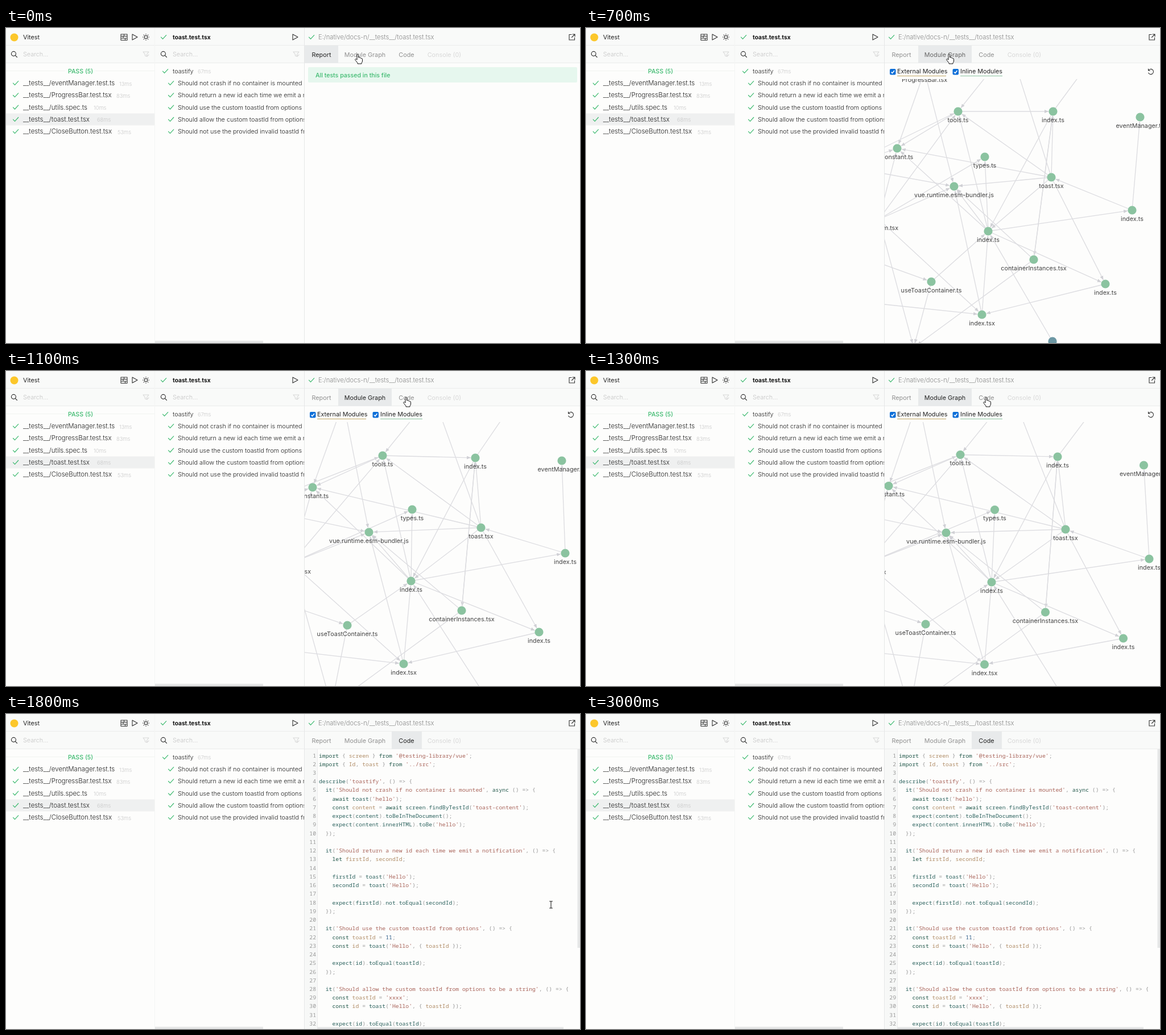
Write an HTML page that moves like this. It is 1009 by 555 pixels and loops after 3100 ms.

```html
<!DOCTYPE html>
<html lang="en">
<head>
<meta charset="utf-8">
<title>Test report</title>
<style>
html, body { margin: 0; width: 100%; height: 100%; overflow: hidden; background: #fdfdfc; }
svg { display: block; width: 1009px; height: 555px; }
text { font: 300 10.8px Inter, "Open Sans", sans-serif; fill: #222; white-space: pre; }
.bar { fill: #f9faf9; }
.rule { stroke: #ebecec; fill: none; }
.icon { stroke: #333; stroke-width: 1.1; fill: none; stroke-linecap: round; stroke-linejoin: round; }
.faint { stroke: #d8d8d8; }
.tick { stroke: #3dba6f; stroke-width: 1.2; }
.hint { fill: #c4c4c4; }
.file { font-size: 11.5px; }
.ms { font-size: 9.3px; fill: #c8c8c8; }
.title { font-weight: 700; font-size: 10.2px; fill: #111; }
.path { font-size: 11.2px; fill: #888; }
.pass { font-weight: 500; font-size: 10.6px; fill: #3dba6f; }
.tab { text-anchor: middle; font-weight: 400; fill: #909090; }
.off { fill: #d8d8d8; }
.thumb { fill: #e6e7e7; }
.opt { font-weight: 400; }
.node text { font-weight: 400; fill: #444; text-anchor: middle; }
.edge { stroke: #dcdce0; stroke-width: 1.3; }
#code text { font: 400 9.77px "Noto Sans Mono", "DejaVu Sans Mono", monospace; fill: #999; }
#code .num { text-anchor: end; }
.str { fill: #a9645a; }
.key { fill: #21574a; }
.def { fill: #b08c66; }
.id { fill: #2c625e; }
.lit { fill: #2f5f8a; }
</style>
</head>
<body>
<svg viewBox="0 0 1009 555">
  <defs>
    <marker id="arrow" viewBox="0 0 7 6" refX="7" refY="3" markerWidth="7" markerHeight="6" markerUnits="userSpaceOnUse" orient="auto">
      <path d="M0 0L7 3L0 6Z" fill="#d0d0d5"/>
    </marker>
    <clipPath id="cases"><rect x="262" y="62" width="262" height="493"/></clipPath>
    <clipPath id="stage"><rect x="525" y="90" width="484" height="465"/></clipPath>
    <path id="tick" class="icon tick" d="M-4.500 .2L-1.500 3.400L4.700 -3.400"/>
    <path id="play" class="icon" d="M-4 -5L5 0L-4 5Z"/>
    <path id="lens" class="icon" d="M2.600 2.600L5.500 5.500M3.400 -.6a4 4 0 1 1 -8 0a4 4 0 1 1 8 0"/>
    <path id="funnel" class="icon faint" d="M-5 -4H5L1.500 .5V4L-1.500 3V.5ZM2 4L5 1"/>
  </defs>

  <rect class="bar" width="1009" height="62"/>
  <path class="rule" d="M0 30.500H1009M0 61.500H1009"/>

  <!-- file list -->
  <circle cx="14.500" cy="16.500" r="7" fill="#fcc72b"/>
  <text x="30" y="20" style="font-weight:400">Vitest</text>
  <path class="icon" d="M202 11H213V21.500H202ZM202 14.500H213M202 18H213M207.500 11V14.500M206 14.500V18M209.500 18V21.500"/>
  <use href="#play" x="226" y="16"/>
  <g class="icon" transform="translate(246 16)">
    <circle r="2.700"/>
    <path d="M0 -5.500V-4.700M0 4.700V5.500M-5.500 0H-4.700M4.700 0H5.500M-3.900 -3.900L-3.400 -3.400M3.400 3.400L3.900 3.900M-3.900 3.900L-3.400 3.400M3.400 -3.400L3.900 -3.900"/>
  </g>
  <use href="#lens" x="14" y="46"/>
  <text class="hint" x="30" y="50">Search...</text>
  <use href="#funnel" x="246" y="46"/>
  <path class="rule" style="stroke:#f1f4f0" d="M0 75.500H104M157 75.500H262"/>
  <text class="pass" x="131" y="79.500" text-anchor="middle">PASS (5)</text>
  <rect y="150.500" width="262" height="21" fill="#eff0f0"/>
  <g id="files"></g>

  <!-- test cases -->
  <use href="#tick" x="277" y="16"/>
  <text class="title" x="293" y="20">toast.test.tsx</text>
  <use href="#play" x="508" y="16"/>
  <use href="#lens" x="277" y="46"/>
  <text class="hint" x="293" y="50">Search...</text>
  <use href="#funnel" x="510" y="46"/>
  <g id="tests" clip-path="url(#cases)">
    <use href="#tick" x="280" y="76"/>
    <text x="293" y="79.500">toastify</text>
    <text class="ms" x="337" y="80">67ms</text>
  </g>
  <rect class="thumb" x="262" y="551" width="190" height="4"/>

  <!-- detail pane -->
  <use href="#tick" x="537" y="16"/>
  <text class="path" x="549" y="20">E:/native/docs-n/__tests__/toast.test.tsx</text>
  <path class="icon" d="M994 11.500H990V21H999.500V17M996 11H1000V15M1000 11L994.500 16.500"/>
  <rect id="mark" y="31" height="31" fill="#e8eaeb"/>
  <g id="tabs">
    <text class="tab" x="554.500" y="50.500">Report</text>
    <text class="tab" x="631" y="50.500">Module Graph</text>
    <text class="tab" x="704" y="50.500">Code</text>
    <text class="tab off" x="770.500" y="50.500">Console (0)</text>
  </g>

  <g id="report">
    <rect x="531" y="69" width="473" height="27" rx="2" fill="#e6f7ee"/>
    <text class="pass" x="544" y="86.500">All tests passed in this file</text>
  </g>

  <g id="graph">
    <g fill="#0d6fd8">
      <rect x="534" y="72" width="10.500" height="10.500" rx="2"/>
      <rect x="644.500" y="72" width="10.500" height="10.500" rx="2"/>
    </g>
    <path d="M536.500 77.500L538.500 79.500L542 75M647 77.500L649 79.500L652.500 75" fill="none" stroke="#fff" stroke-width="1.500"/>
    <text class="opt" x="547" y="80">External Modules</text>
    <text class="opt" x="658" y="80">Inline Modules</text>
    <path d="M547 84.500H633" stroke="#c2a765"/>
    <path d="M658 84.500H732" stroke="#8bc3a0"/>
    <path class="icon" d="M989 74.500a4.600 4.600 0 1 1 -.3 4.500M988.500 72V75H991.500"/>
    <g clip-path="url(#stage)"><g id="edges"></g><g id="nodes"></g></g>
  </g>

  <g id="code">
    <rect x="525" y="62" width="22" height="493" fill="#f7f8f7"/>
    <path class="rule" d="M547.500 62V555"/>
    <rect class="thumb" x="1004.500" y="62" width="4.500" height="350"/>
    <rect class="thumb" x="547" y="551.500" width="433" height="3.500"/>
  </g>

  <path class="rule" style="stroke:#f4f5f4" d="M261.500 0V555"/>
  <path class="rule" style="stroke:#e6e7e7" d="M524.500 0V555"/>

  <path id="hand" fill="#fff" stroke="#111" stroke-linejoin="round" d="M-3 2V-6.500Q-3 -8 -1.700 -8Q-.4 -8 -.4 -6.500V-2.200Q1.800 -3.200 2.100 -1.300Q4 -2 4.400 -.4Q6.500 -.8 6.500 1.300V4Q6.500 6 5 7.500V9H-2V7.500L-6 2.500Q-6.800 1 -5.500 .5Q-4.500 .3 -3 2Z"/>
  <path id="beam" class="icon" style="stroke:#222" d="M-2.500 -6H-.7L0 -5.300L.7 -6H2.500M0 -5.300V5.300M-2.500 6H-.7L0 5.300L.7 6H2.500"/>
</svg>

<script>
const LOOP = 3100, GRAPH_AT = 300, CODE_AT = 1600;
const $ = id => document.getElementById(id);

function add(parent, tag, attrs = {}, text = '') {
  const el = document.createElementNS('http://www.w3.org/2000/svg', tag);
  for (const k in attrs) el.setAttribute(k, attrs[k]);
  el.textContent = text;
  return parent.appendChild(el);
}

// name, duration, x of the duration
const files = [
  ['eventManager.test.ts', 13, 199], ['ProgressBar.test.tsx', 83, 194],
  ['utils.spec.ts', 10, 154], ['toast.test.tsx', 68, 160], ['CloseButton.test.tsx', 53, 196]
];
files.forEach(([name, ms, x], i) => {
  const y = 97 + i * 21.3;
  add($('files'), 'use', { href: '#tick', x: 17, y });
  add($('files'), 'text', { class: 'file', x: 30, y: y + 4 }, '__tests__/' + name);
  add($('files'), 'text', { class: 'ms', x, y: y + 4.5 }, ms + 'ms');
});

['not crash if no container is mounted', 'return a new id each time we emit a notification',
 'use the custom toastId from options', 'allow the custom toastId from options to be a string',
 'not use the provided invalid toastId from options'].forEach((name, i) => {
  const y = 97 + i * 21.3;
  add($('tests'), 'use', { href: '#tick', x: 290, y });
  add($('tests'), 'text', { x: 302, y: y + 4 }, 'Should ' + name);
});

const source = `import { screen } from '@testing-library/vue';
import { Id, toast } from '../src';

describe('toastify', () => {
  it('Should not crash if no container is mounted', async () => {
    await toast('hello');
    const content = await screen.findByTestId('toast-content');
    expect(content).toBeInTheDocument();
    expect(content.innerHTML).toBe('hello');
  });

  it('Should return a new id each time we emit a notification', () => {
    let firstId, secondId;

    firstId = toast('Hello');
    secondId = toast('Hello');

    expect(firstId).not.toEqual(secondId);
  });

  it('Should use the custom toastId from options', () => {
    const toastId = 11;
    const id = toast('Hello', { toastId });

    expect(id).toEqual(toastId);
  });

  it('Should allow the custom toastId from options to be a string', () => {
    const toastId = 'xxxx';
    const id = toast('Hello', { toastId });

    expect(id).toEqual(toastId);`;
const token = /(?<str>'[^']*')|(?<key>\b(?:import|from|async|await|const|let)\b)|(?<def>(?<=(?:const|let|\{|Id,) )\w+)|(?<lit>\b\d+)|(?<id>\w+)|[^\w']+/g;
source.split('\n').forEach((line, i) => {
  const y = 76.5 + i * 15.24;
  add($('code'), 'text', { class: 'num', x: 545, y }, i + 1);
  const row = add($('code'), 'text', { x: 550, y });
  for (const m of line.matchAll(token)) {
    const kind = Object.keys(m.groups).find(k => m.groups[k]);
    add(row, 'tspan', kind ? { class: kind } : {}, m[0]);
  }
});

// each module: label, then x,y at three moments 400 ms apart
const modules = {
  A: ['tools.ts', 654, 147, 662, 149, 654, 146],
  B: ['index.ts', 821, 147, 825, 153, 833, 149],
  C: ['eventManager.ts', 974, 157, 977, 158, 984, 174],
  D: ['constant.ts', 547, 212, 539, 205, 525, 200],
  E: ['types.ts', 701, 227, 714, 244, 723, 245],
  F: ['vue.runtime.esm-bundler.js', 647, 279, 638, 284, 628, 286],
  G: ['toast.tsx', 818, 263, 835, 276, 851, 282],
  H: ['index.ts', 960, 321, 983, 321, 997, 341],
  I: ['index.ts', 707, 358, 712, 370, 714, 374],
  J: ['containerInstances.tsx', 787, 408, 801, 422, 814, 428],
  K: ['index.ts', 913, 451, 937, 460, 952, 482],
  L: ['useToastContainer.ts', 607, 447, 600, 448, 594, 444],
  M: ['index.tsx', 696, 505, 699, 516, 702, 518],
  N: ['ToastItem.tsx', 515, 337, 502, 338, 485, 340],
  O: ['ProgressBar.tsx', 595, 76, 593, 55, 575, 44],
  P: ['toast.test.tsx', 820, 552, 842, 572, 844, 590],
  Q: ['utils.ts', 745, 33, 750, 40, 746, 33],
  R: ['index.ts', 885, 60, 890, 58, 905, 62],
  S: ['index.ts', 576, 563, 572, 590, 566, 606],
  V: ['Icons.tsx', 455, 244, 430, 240, 410, 240],
  W: ['index.ts', 440, 387, 436, 392, 434, 393],
  X: ['index.tsx', 430, 477, 430, 485, 430, 490]
};
const links = ('AB QA GA IA VA NA AD OD GD ID ND VD OF VF NF GF IF JF MF NE IE ' +
  'GI BI LI PI MI GB BJ JB GK IK IH HG HC KM XM NM WL LS JS NS GQ BR').split(' ');

const nodes = Object.entries(modules).map(([key, [label, ...track]]) => {
  const el = add($('nodes'), 'g', { class: 'node' });
  add(el, 'circle', { r: 7.6, fill: key === 'P' ? '#6d98a4' : '#8bc3a0' });
  add(el, 'text', { y: 18.5 }, label);
  return { key, track, el };
});
const edges = links.map(pair => ({
  pair, el: add($('edges'), 'line', { class: 'edge', 'marker-end': 'url(#arrow)' })
}));

const mix = (a, b, u) => a + (b - a) * u;

function place(track, t) {
  const u = Math.max(0, (t - 700) / 400), k = u < 1 ? 0 : 2;
  const x = mix(track[k], track[k + 2], u - k / 2);
  const y = mix(track[k + 1], track[k + 3], u - k / 2);
  // modules spread out from the middle while the layout settles
  const rest = Math.max(0, (700 - t) / (700 - GRAPH_AT));
  const spread = 1 - 0.65 * rest * rest;
  return [mix(700, x, spread), mix(310, y, spread)];
}

function drawGraph(t) {
  const at = {};
  for (const n of nodes) {
    at[n.key] = place(n.track, t);
    n.el.setAttribute('transform', `translate(${at[n.key]})`);
  }
  for (const { pair, el } of edges) {
    const [x1, y1] = at[pair[0]], [x2, y2] = at[pair[1]];
    const cut = 8 / (Math.hypot(x2 - x1, y2 - y1) || 1);
    const ends = { x1, y1, x2: mix(x2, x1, cut), y2: mix(y2, y1, cut) };
    for (const k in ends) el.setAttribute(k, ends[k]);
  }
}

// time, x, y
const handPath = [[0, 620, 54], [300, 638, 54], [700, 640, 54], [1100, 705, 54], [1700, 705, 54]];
const beamPath = [[1600, 705, 80], [1800, 958, 336], [2000, 958, 336]];

function follow(path, t) {
  const i = Math.max(1, path.findIndex(p => p[0] > t));
  const [t0, x0, y0] = path[i - 1], [t1, x1, y1] = path[i];
  const u = (t - t0) / (t1 - t0);
  return `translate(${mix(x0, x1, u)} ${mix(y0, y1, u)})`;
}

const show = (id, on) => { $(id).style.display = on ? '' : 'none'; };
const panes = ['report', 'graph', 'code'];
const spans = [[525, 59], [584, 94], [678, 53]];

function render(t) {
  const pane = t < GRAPH_AT ? 0 : t < CODE_AT ? 1 : 2;
  panes.forEach((id, i) => {
    show(id, i === pane);
    const hovered = i === 1 && t <= 700;
    $('tabs').children[i].style.fill = i !== pane ? '' : hovered ? '#666' : '#222';
  });
  $('mark').setAttribute('x', spans[pane][0]);
  $('mark').setAttribute('width', spans[pane][1]);
  if (pane === 1) drawGraph(t);

  const hand = t < CODE_AT, beam = !hand && t < 1900;
  show('hand', hand);
  show('beam', beam);
  if (hand) $('hand').setAttribute('transform', follow(handPath, t));
  if (beam) $('beam').setAttribute('transform', follow(beamPath, t));
}

function tick() {
  const t = performance.now() % LOOP;
  render(Math.floor(t / 100) * 100);
  requestAnimationFrame(tick);
}
tick();
</script>
</body>
</html>
```
